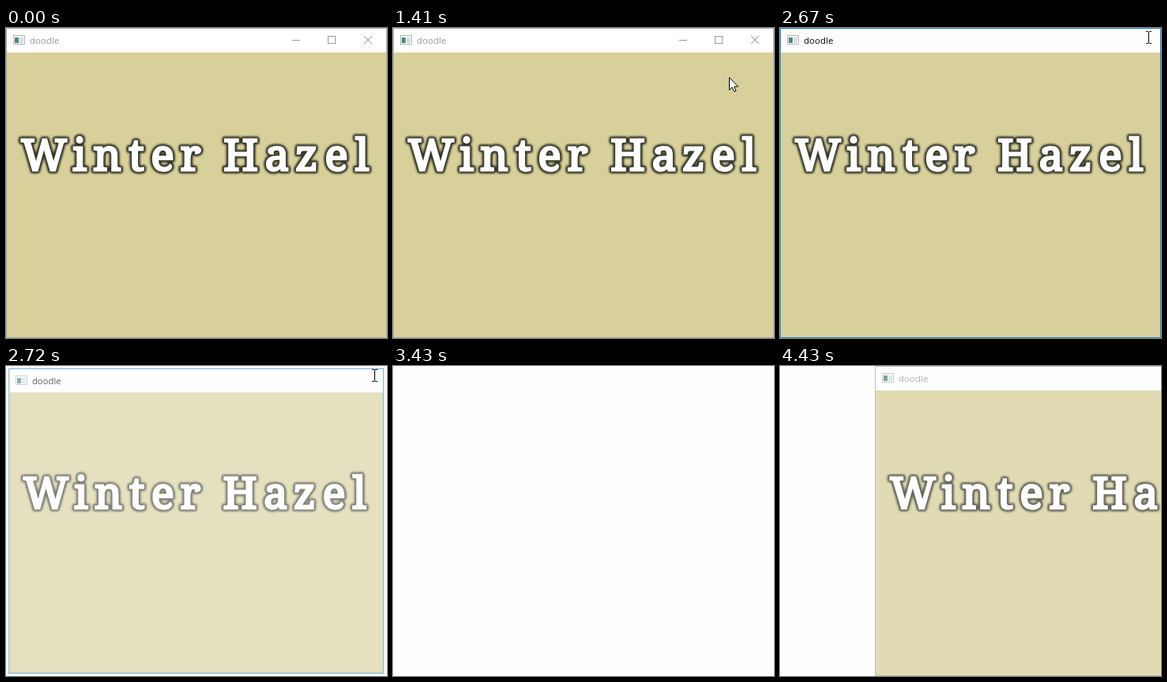
Write an HTML page that moves like this. It is 482 by 392 pixels and loops after 4500 ms.

```html
<!DOCTYPE html>
<html lang="en">
<head>
<meta charset="utf-8">
<title>doodle</title>
<style>
  html, body { margin: 0; width: 100%; height: 100%; overflow: hidden; background: #fefefe; }
  svg { display: block; width: 482px; height: 392px; }
  .caption { font: 11.5px "Open Sans", "Noto Sans", sans-serif; }
  .label { font: 55px "Noto Serif", serif; text-anchor: middle; }
</style>
</head>
<body>
<svg viewBox="0 0 482 392">
  <defs>
    <filter id="soft" x="-5%" y="-30%" width="110%" height="160%"><feGaussianBlur stdDeviation="1.2"/></filter>
    <filter id="shade" x="-5%" y="-5%" width="110%" height="110%"><feGaussianBlur stdDeviation="3"/></filter>
    <text id="word" class="label" y="179.6"></text>
  </defs>
  <rect id="shadow" x="-1" y="1" width="484" height="392" fill="none" stroke="#000" stroke-width="5" opacity=".04" filter="url(#shade)"/>
  <g id="win">
    <rect width="482" height="392" fill="#fff"/>
    <rect x="1" y="31" width="480" height="360" fill="#d7d09b"/>
    <g shape-rendering="crispEdges">
      <rect x="9.5" y="9.5" width="14" height="11" fill="#fafafa" stroke="#b0b6b6"/>
      <rect x="11" y="12" width="5" height="7" fill="#4f8583"/>
      <rect x="17" y="12" width="5" height="7" fill="#d3dfe0"/>
    </g>
    <text id="caption" class="caption" x="30" y="20">doodle</text>
    <g id="buttons" fill="none">
      <rect id="hot" x="436" y="1" width="45" height="29"/>
      <path id="sizers" d="M362 15.5h10M407.5 10.5h9v9h-9z" shape-rendering="crispEdges"/>
      <path id="cross" d="M453 10l10 10M463 10l-10 10"/>
    </g>
    <use href="#word" fill="none" stroke="#363427" stroke-width="8.2" stroke-linejoin="round" filter="url(#soft)"/>
    <use href="#word" fill="#fff" stroke="#fff" stroke-width="2.8"/>
    <rect id="border" x=".5" y=".5" width="481" height="391" fill="none"/>
  </g>
  <path id="arrow" d="M.5 .5v16l3.7-3.5 2.5 5.5 2.3-1-2.4-5.4h5z" fill="#fff" stroke="#000"/>
  <path id="beam" d="M-3 -7.5h3M1 -7.5h3M.5 -7v14M-3 7.5h3M1 7.5h3" fill="none" stroke="#000" shape-rendering="crispEdges"/>
</svg>
<script>
const LOOP = 4500;
const $ = id => document.getElementById(id);
const set = (id, attrs) => {
  for (const name in attrs) $(id).setAttribute(name, attrs[name]);
};
const show = (id, on) => set(id, { display: on ? "inline" : "none" });
const lerp = (a, b, p) => a + (b - a) * p;

// Progress from 0 to 1 in a fixed number of held steps
const stepped = (t, start, hold, count) =>
  Math.max(0, Math.min(1, (Math.floor((t - start) / hold) + 1) / count));

const centers = [48, 93, 128, 165, 198, 233.5, 297, 343, 380, 418, 450.5];
[..."WinterHazel"].forEach((letter, i) => {
  const span = document.createElementNS("http://www.w3.org/2000/svg", "tspan");
  span.setAttribute("x", centers[i]);
  span.textContent = letter;
  $("word").append(span);
});

function arrowAt(t) {
  if (t < 1230) {
    const p = (stepped(t, 670, 46, 12) * 12 - 1) / 11;
    return [lerp(401, 416, p), lerp(378, 111, 1 - (1 - p) ** 1.6)];
  }
  const p = stepped(t, 1230, 45, 11);
  const nudge = t < 1870 ? 0 : t < 1970 ? 1 : 2;
  return [lerp(416, 464, p ** 2.1), lerp(111, 13, p ** 0.87) - nudge];
}

function beamAt(t) {
  const p = stepped(t, 3030, 50, 8);
  return [lerp(466, 347, p), lerp(12, 384, p ** 1.4)];
}

function windowAt(t) {
  if (t < 2670) return { x: 0, scale: 1, opacity: 1 };
  if (t < 2720) return { x: 0, scale: 1, opacity: 0.98 };
  if (t < 2750) return { x: 0, scale: 0.985, opacity: 0.62 };
  if (t < 2800) return { x: 0, scale: 0.963, opacity: 0.21 };
  if (t < 4290) return { x: 0, scale: 1, opacity: 0 };
  const k = Math.floor((t - 4290) / 70);
  return { x: Math.round(361 - 120.4 * k), scale: 1, opacity: 0.27 + 0.24 * k };
}

const place = (id, [x, y]) => set(id, { transform: `translate(${Math.round(x)} ${Math.round(y)})` });

function draw(t) {
  const active = t >= 2570 && t < 2800;
  const closing = t >= 2670 && t < 2800;
  const { x, scale, opacity } = windowAt(t);
  const transform = `translate(${x} 0) translate(222 191) scale(${scale}) translate(-222 -191)`;
  set("win", { transform, opacity });
  set("shadow", { transform });
  show("shadow", closing && scale < 1);
  set("caption", { fill: active ? "#000" : "#999" });
  set("border", { stroke: active ? "#2580c4" : "#a9a9a9" });

  const arrowOn = t >= 670 && t < 2670;
  const [ax, ay] = arrowAt(t);
  const hover = arrowOn && ax >= 436 && ay < 30;
  show("buttons", !closing);
  set("hot", { fill: !hover ? "none" : active ? "#f1707a" : "#e81123" });
  set("sizers", { stroke: active ? "#000" : "#999" });
  set("cross", { stroke: hover ? "#fff" : "#888" });

  show("arrow", arrowOn);
  place("arrow", [ax, ay]);
  show("beam", t >= 2670 && t < 3430);
  place("beam", beamAt(t));
}

const began = performance.now();
function tick() {
  draw((performance.now() - began) % LOOP);
  requestAnimationFrame(tick);
}
draw(0);
requestAnimationFrame(tick);
</script>
</body>
</html>
```
